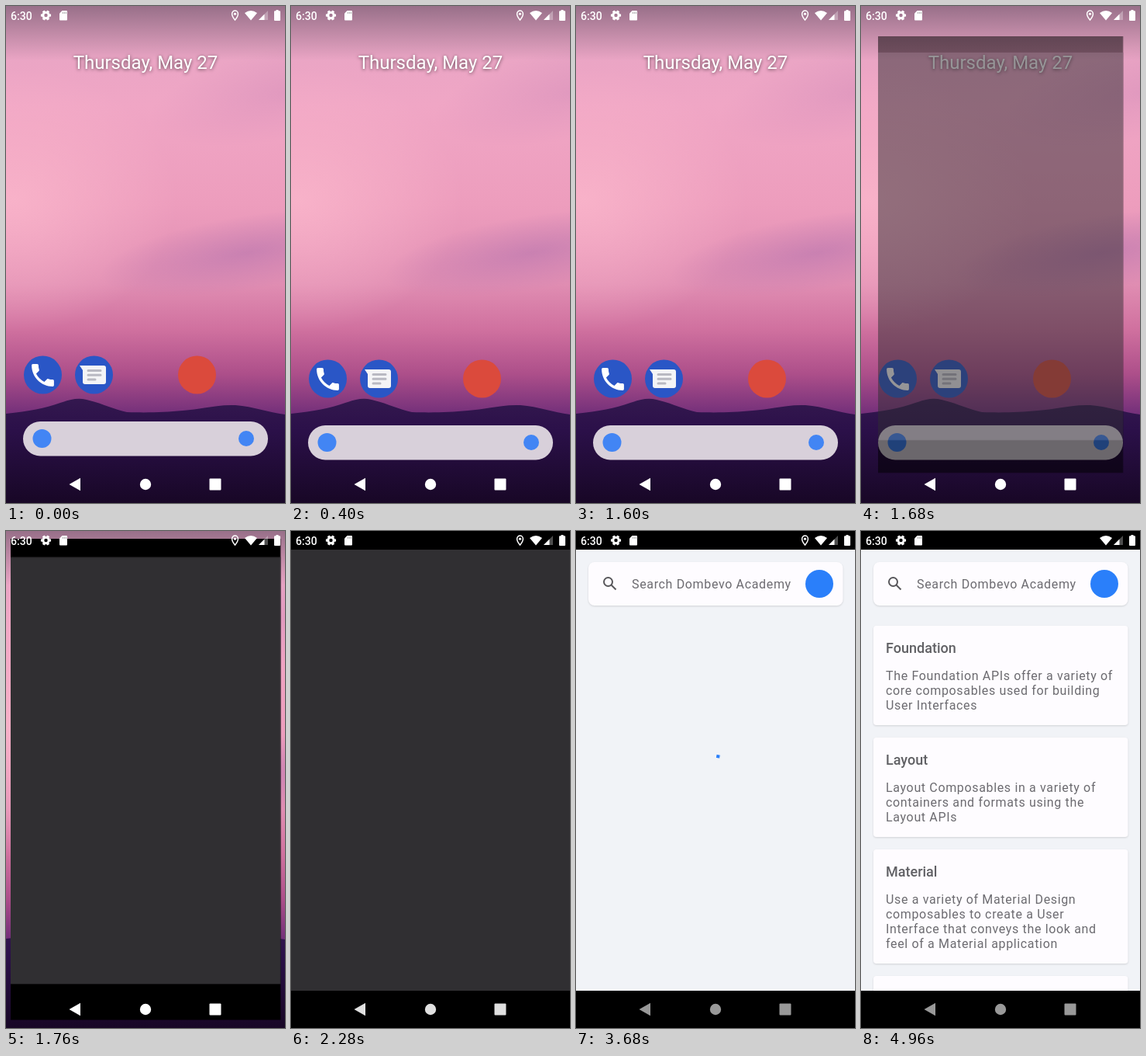
Animation, 360 px wide and 640 px high, one loop 5 s. Source, as an HTML page:

```html
<!DOCTYPE html>
<html lang="en">
<head>
<meta charset="utf-8">
<title>App launch</title>
<style>
  html, body { margin: 0; width: 100%; height: 100%; overflow: hidden; background: #000; }
  svg { display: block; width: 100%; height: 100%; font-family: Roboto, sans-serif; }

  .settle, .fade, .zoom, .app, .list, .loader, .orbit, .arc, .nav, .pin {
    animation: 5s linear infinite;
  }
  .settle { animation-name: settle; }
  .fade { animation-name: fade; }
  .zoom { animation-name: zoom; transform-origin: 180px 320px; }
  .app { animation-name: app; animation-timing-function: step-end; }
  .list { animation-name: list; animation-timing-function: step-end; }
  .loader { animation-name: loader; animation-timing-function: step-end; }
  .orbit { animation-name: orbit; transform-origin: 180px 308px; }
  .arc { animation-name: arc; }
  .nav { animation-name: nav; }
  .pin { animation-name: pin; animation-timing-function: step-end; }

  @keyframes settle {
    0% { transform: translateY(-5px); animation-timing-function: cubic-bezier(.3, 0, .3, 1); }
    7%, 100% { transform: none; }
  }
  @keyframes fade {
    0%, 32.4% { opacity: 0; }
    34.8%, 100% { opacity: 1; }
  }
  @keyframes zoom {
    0%, 32.4% { transform: scale(.75); animation-timing-function: cubic-bezier(.333, 1, .667, 1); }
    38.1%, 100% { transform: scale(1); }
  }
  @keyframes app { 0% { opacity: 0; } 72.8%, 100% { opacity: 1; } }
  @keyframes list { 0% { opacity: 0; } 79.2%, 100% { opacity: 1; } }
  @keyframes loader { 0% { opacity: 1; } 79.2%, 100% { opacity: 0; } }
  @keyframes orbit {
    0%, 73.2% { transform: rotate(-84.3deg); }
    99.84%, 100% { transform: rotate(201.7deg); }
  }
  @keyframes arc {
    0%, 73.2% { stroke-dasharray: .1 360; animation-timing-function: cubic-bezier(.4, 0, .2, 1); }
    86.52%, 100% { stroke-dasharray: 290 360; }
  }
  @keyframes nav {
    0%, 36% { fill: #fff; }
    68%, 100% { fill: #999; }
  }
  @keyframes pin { 0% { opacity: 1; } 95.2%, 100% { opacity: 0; } }

  .date { font-size: 24px; fill: #fff; text-anchor: middle; filter: drop-shadow(0 1px 2px #0009); }
  .clock { font-size: 14px; font-weight: 500; }
  .card { fill: #fefcff; filter: drop-shadow(0 1px 1px #0002); }
  .title { font-size: 18px; font-weight: 500; fill: #606064; }
  .body { font-size: 16px; letter-spacing: .65px; fill: #6c6b70; }
</style>
</head>
<body>
<svg viewBox="0 0 360 640">
  <defs>
    <linearGradient id="sky" x2="0" y2="1">
      <stop offset="0" stop-color="#e4a4c4"/>
      <stop offset=".2" stop-color="#f0a6c5"/>
      <stop offset=".4" stop-color="#ed9dbd"/>
      <stop offset=".56" stop-color="#e08db2"/>
      <stop offset=".65" stop-color="#d0719f"/>
      <stop offset=".74" stop-color="#ad4f8a"/>
      <stop offset=".82" stop-color="#74307a"/>
    </linearGradient>
    <radialGradient id="glow">
      <stop offset="0" stop-color="#f9b4ca" stop-opacity=".9"/>
      <stop offset="1" stop-color="#f9b4ca" stop-opacity="0"/>
    </radialGradient>
    <radialGradient id="haze">
      <stop offset="0" stop-color="#c07bb0" stop-opacity=".75"/>
      <stop offset="1" stop-color="#c07bb0" stop-opacity="0"/>
    </radialGradient>
    <linearGradient id="scrim" x2="0" y2="1">
      <stop offset="0" stop-color="#302838" stop-opacity=".42"/>
      <stop offset="1" stop-color="#302838" stop-opacity="0"/>
    </linearGradient>
    <linearGradient id="hill" x2="0" y2="1">
      <stop offset="0" stop-color="#34184f"/>
      <stop offset=".3" stop-color="#2b1049"/>
      <stop offset="1" stop-color="#180726"/>
    </linearGradient>
  </defs>

  <g id="wallpaper">
    <path fill="url(#sky)" d="M0 0H360V640H0Z"/>
    <ellipse cx="10" cy="250" rx="210" ry="170" fill="url(#glow)"/>
    <ellipse cx="310" cy="318" rx="190" ry="48" fill="url(#haze)" transform="rotate(-9 310 318)"/>
    <ellipse cx="370" cy="110" rx="190" ry="60" fill="url(#haze)" opacity=".4" transform="rotate(-12 370 110)"/>
    <path fill="url(#scrim)" d="M0 0H360V70H0Z"/>
    <path fill="url(#hill)" d="M0 525C30 522 50 518 70 511C82 507 92 504 104 507C122 511 138 519 156 523C185 524 205 523 228 521C255 519 272 513 296 514C320 516 338 523 360 526V640H0Z"/>
  </g>

  <text class="date" x="180" y="81">Thursday, May 27</text>

  <g class="settle">
    <g fill="#2a56c6">
      <circle cx="47.5" cy="480" r="24.5"/>
      <circle cx="113.5" cy="480" r="24.5"/>
    </g>
    <path fill="#fff" transform="translate(28.3 461.3) scale(1.6)" d="M6.62 10.79c1.44 2.83 3.76 5.14 6.59 6.59l2.2-2.2c.27-.27.67-.36 1.02-.24 1.12.37 2.33.57 3.57.57.55 0 1 .45 1 1V20c0 .55-.45 1-1 1-9.39 0-17-7.61-17-17 0-.55.45-1 1-1h3.5c.55 0 1 .45 1 1 0 1.25.2 2.45.57 3.57.11.35.03.74-.25 1.02z"/>
    <path fill="#f4f4f6" d="M95 468H126Q129 468 129 471V489Q129 492 126 492H102Q99 492 99 489V474Z"/>
    <path stroke="#b9b9c2" stroke-width="3" stroke-linecap="round" d="M106 474.5H122M106 480.3H122M106 486H115"/>
    <circle cx="246.5" cy="480" r="24.5" fill="#db4a3c"/>
    <rect x="22" y="540" width="316" height="44.5" rx="22.2" fill="#d8d0da"/>
    <circle cx="46.5" cy="562" r="12" fill="#4285f4"/>
    <circle cx="310" cy="562" r="10" fill="#4285f4"/>
  </g>

  <g class="fade">
    <g class="zoom">
      <path d="M0 0H360V640H0Z"/>
      <path fill="#302f32" d="M0 24H360V592H0Z"/>
      <g class="app">
        <path fill="#f1f3f7" d="M0 24H360V592H0Z"/>
        <rect class="card" x="16" y="40" width="328.5" height="56" rx="8"/>
        <g fill="none" stroke="#58575b" stroke-width="2">
          <circle cx="41.5" cy="65.5" r="5.5"/>
          <path d="M45.5 69.5L51.5 75.5"/>
        </g>
        <text class="body" x="72" y="74">Search Dombevo Academy</text>
        <circle cx="314" cy="68" r="18" fill="#2a7ffa"/>

        <g class="loader">
          <g class="orbit">
            <circle class="arc" cx="180" cy="308" r="18" pathLength="360" fill="none" stroke="#2a7ffa" stroke-width="4" stroke-linecap="square"/>
          </g>
        </g>

        <g class="list">
          <g transform="translate(16 122)">
            <rect class="card" width="328.5" height="128" rx="4"/>
            <text class="title" x="16" y="35">Foundation</text>
            <text class="body">
              <tspan x="16" y="70">The Foundation APIs offer a variety of</tspan>
              <tspan x="16" y="89">core composables used for building</tspan>
              <tspan x="16" y="108">User Interfaces</tspan>
            </text>
          </g>
          <g transform="translate(16 266)">
            <rect class="card" width="328.5" height="128" rx="4"/>
            <text class="title" x="16" y="35">Layout</text>
            <text class="body">
              <tspan x="16" y="70">Layout Composables in a variety of</tspan>
              <tspan x="16" y="89">containers and formats using the</tspan>
              <tspan x="16" y="108">Layout APIs</tspan>
            </text>
          </g>
          <g transform="translate(16 410)">
            <rect class="card" width="328.5" height="147" rx="4"/>
            <text class="title" x="16" y="35">Material</text>
            <text class="body">
              <tspan x="16" y="70">Use a variety of Material Design</tspan>
              <tspan x="16" y="89">composables to create a User</tspan>
              <tspan x="16" y="108">Interface that conveys the look and</tspan>
              <tspan x="16" y="127">feel of a Material application</tspan>
            </text>
          </g>
          <rect class="card" x="16" y="573" width="328.5" height="60" rx="4"/>
        </g>
        <path d="M0 592H360V640H0Z"/>
      </g>
    </g>
  </g>

  <g id="status" fill="#fff">
    <text class="clock" x="6" y="17.5">6:30</text>
    <g fill="none" stroke="#fff">
      <circle cx="51.5" cy="12" r="3.7" stroke-width="3"/>
      <circle cx="51.5" cy="12" r="5.4" stroke-width="2.4" pathLength="12" stroke-dasharray="1.1 .9" stroke-dashoffset=".55"/>
    </g>
    <path d="M72.5 6H78Q79 6 79 7V17.5Q79 18.5 78 18.5H70Q69 18.5 69 17.5V9.5Z"/>
    <path stroke="#0005" d="M73.5 7.5V10M75.5 7.5V10M77.5 7.5V10"/>
    <g class="pin">
      <path fill="none" stroke="#fff" stroke-width="1.5" d="M295.5 18C293 15 291.6 12.6 291.6 10.2A3.9 4.1 0 0 1 299.4 10.2C299.4 12.6 298 15 295.5 18Z"/>
      <circle cx="295.5" cy="10.2" r="1.6"/>
    </g>
    <path d="M316 18.5L308 9Q316 3 324 9Z"/>
    <path opacity=".3" d="M338 6V18H326Z"/>
    <path d="M333.5 10.5V18H326Z"/>
    <path d="M348.5 5H351.5V6.3H353Q354 6.3 354 7.3V18Q354 19 353 19H347Q346 19 346 18V7.3Q346 6.3 347 6.3H348.5Z"/>
  </g>

  <g class="nav">
    <path d="M81.5 616L96 607.8V624.2Z"/>
    <circle cx="180" cy="616" r="7.2"/>
    <rect x="262.5" y="608.5" width="15" height="15" rx="1"/>
  </g>
</svg>
</body>
</html>
```
